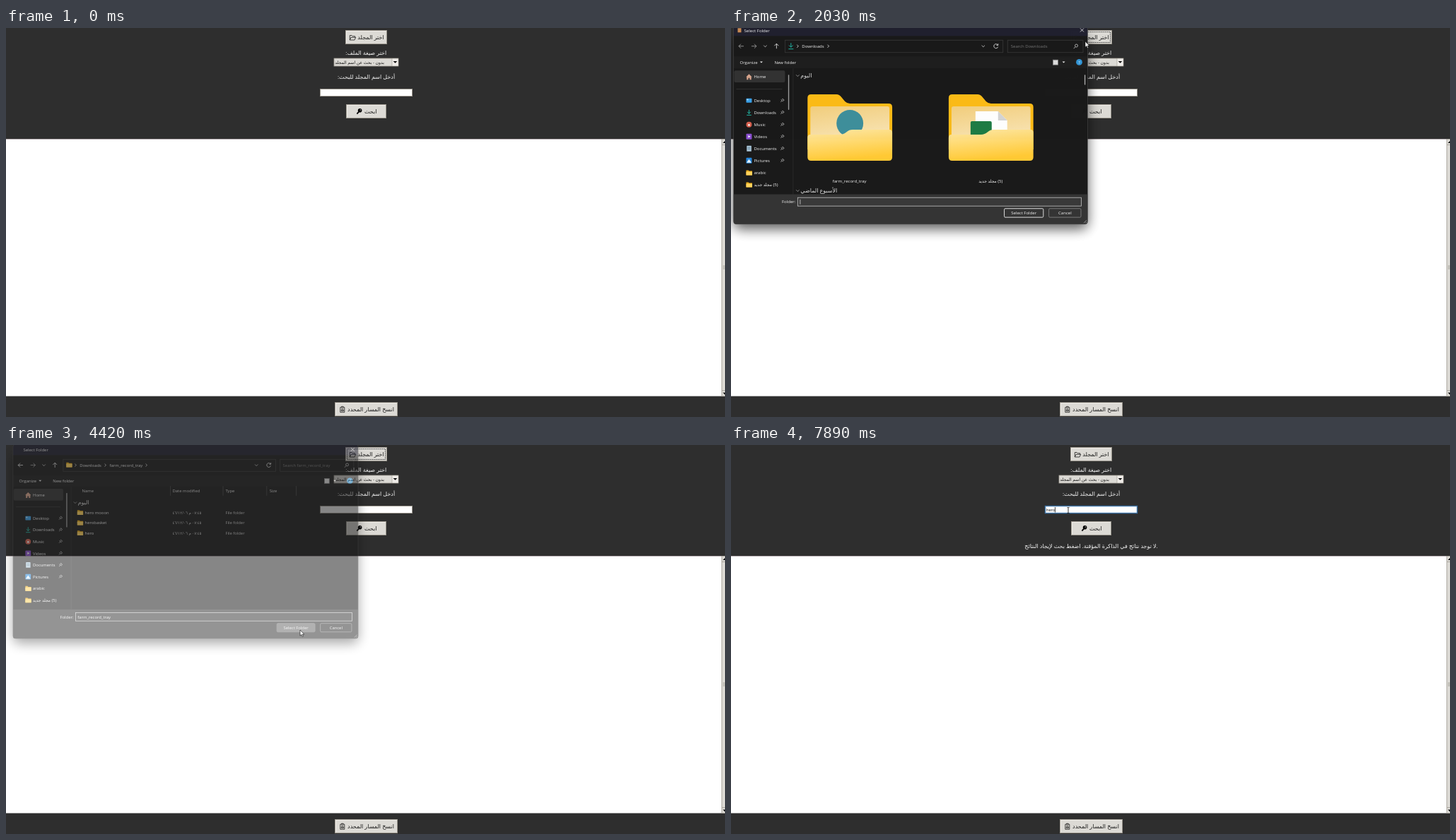
Animation, 1017 px wide and 551 px high, one loop 8 s. Source, as an HTML page:

```html
<!DOCTYPE html>
<html lang="ar">
<head>
<meta charset="utf-8">
<title>Folder search</title>
<style>
html, body { margin: 0; width: 100%; height: 100%; overflow: hidden; background: #2e2e2e; }
svg { display: block; width: 1017px; height: 551px; font-family: 'Open Sans', 'DejaVu Sans', sans-serif; }
</style>
</head>
<body>
<svg id="stage" viewBox="0 0 1017 551" xmlns="http://www.w3.org/2000/svg"></svg>
<script>
const LOOP = 8000;
const NAME = 'farm_record_tray';
const NEW_DIR = 'مجلد جديد\u200e (5)';
const WHITE = '#f4f4f4';

// Markup helpers
const rect = (x, y, w, h, fill, more = '') =>
  `<rect x="${x}" y="${y}" width="${w}" height="${h}" fill="${fill}" ${more}/>`;
const line = (d, color = WHITE, w = .8, more = '') =>
  `<path d="${d}" fill="none" stroke="${color}" stroke-width="${w}" ${more}/>`;
const shape = (d, fill, more = '') => `<path d="${d}" fill="${fill}" ${more}/>`;
const disc = (x, y, r, fill) => `<circle cx="${x}" cy="${y}" r="${r}" fill="${fill}"/>`;
const text = (x, y, s, size = 6.05, fill = WHITE, more = '') =>
  `<text x="${x}" y="${y}" font-size="${size}" fill="${fill}" ${more}>${s}</text>`;
const mid = 'text-anchor="middle"';
const rtl = mid + ' direction="rtl"';
const group = (id, body, more = '') => `<g id="${id}" ${more}>${body}</g>`;
const right = (x, y) => line(`M${x - 1} ${y - 2}l2 2-2 2`);
const down = (x, y, c = WHITE) => line(`M${x - 2.2} ${y - 1.1}l2.2 2.2 2.2-2.2`, c, .7);
const caretDown = (x, y, c = WHITE, r = 2) => shape(`M${x - r} ${y - r / 2}h${2 * r}l${-r} ${r}z`, c);
const smallFolder = (x, y) =>
  shape(`M${x} ${y}h3.2l1 1.1h4.3v6h-8.5z`, '#e8a917') + rect(x, y + 2.1, 8.5, 5, '#ffd35c', 'rx=".6"');

// Main window
function button(id, x, y, w, h) {
  return `<rect id="${id}" x="${x + .5}" y="${y + .5}" width="${w - 1}" height="${h - 1}" fill="#dcdad5" stroke="#9e9a91"/>` +
    line(`M${x + 1.5} ${y + h - 1.5}V${y + 1.5}H${x + w - 1.5}`, '#eeebe7', 1);
}

function app() {
  const ink = '#1a1a1a';
  return rect(0, 0, 1017, 551, '#2e2e2e') +
    button('pick', 480, 3, 59, 20) +
    line('M486.3 17V10.5h2.8l1 1.2h3.5v1.6M486.3 17l1.8-3.7h6.6l-1.7 3.7z', ink, .8) +
    text(516, 16.3, 'اختر المجلد', 8, ink, rtl) +
    group('ring', line('M482.5 5.5h54v15h-54z', '#222', .8, 'stroke-dasharray="1 .6"')) +
    text(509.3, 38.3, 'اختر صيغة الملف:', 8, WHITE, rtl) +
    rect(464, 43, 91, 11, '#dcdad5', 'stroke="#9e9a91" stroke-width=".8"') +
    rect(546, 43.6, 8.6, 9.8, '#eeebe7') + line('M546 43v11', '#9e9a91', .6) +
    caretDown(550.5, 48.3, '#000', 2.8) +
    text(465.3, 50.7, 'بدون - بحث عن اسم المجلد', 6.15, '#111') +
    text(509.5, 72, 'أدخل اسم المجلد للبحث:', 8, WHITE, rtl) +
    '<rect id="field" x="444.5" y="86.5" width="130" height="10" fill="#fff"/>' +
    text(446, 93.8, '', 5.6, '#111', 'id="typed"') +
    '<path id="caret" fill="none" stroke="#111" stroke-width=".8"/>' +
    button('find', 481, 108, 57, 20) +
    disc(500.6, 116.8, 2.8, '#000') + line('M499 118.6l-2.6 3', '#000', 1.7) + disc(501.3, 116, .9, '#777') +
    text(515.7, 121.2, 'ابحث', 8, ink, rtl) +
    group('current',
      line('M393.4 146.8v-7.2h3l1 1.4h4.3v5.8zM393.4 142h3.2l1-1', WHITE, .8) +
      text(449.8, 146, 'المجلد الحالي', 7.9, WHITE, 'text-anchor="end"') +
      text(449.8, 146, ': C:/Users/nemud/Downloads/' + NAME, 7.9)) +
    group('empty', text(509.5, 146, 'لا توجد نتائج في الذاكرة المؤقتة. اضغط بحث لإيجاد النتائج.', 8, WHITE, mid)) +
    rect(0, 157, 1017, 364.5, '#fff') + rect(0, 157, 1013, 1, '#b9b0b3') +
    rect(1012.5, 157.5, 5, 364, '#dcdad5', 'stroke="#9e9a91" stroke-width=".8"') +
    line('M1013 165.5h4M1013 513.5h4M1014 337h3M1014 339h3M1014 341h3', '#9e9a91', .8) +
    shape('M1014 163l3-3v3z', '#000') + shape('M1014 516.5h3v3z', '#000') +
    button('copy', 465, 530, 89, 20) +
    line('M472.8 537.3h6v7h-6zM474.4 537.2v-1h2.8v1M474.2 539.5h3.2M474.2 542.5h3.2v-1.4h-3.2z', ink, .8) +
    text(516, 543.2, 'انسخ المسار المحدد', 8, ink, rtl);
}

// Folder dialog
function bigFolder(x, inside) {
  return `<g transform="translate(${x} 94)">` +
    shape('M0 5q0-5 5-5h36q4 0 7 4l5 6q3 3 7 3h55q5 0 5 5v60H0z', '#fcbc16') +
    rect(4, 17, 112, 60, 'url(#paper)', 'rx="3"') + inside +
    shape('M0 61q0-4 4-4h42q5 0 9-3.500t9-3.500h52q4 0 4 4v35q0 5-5 5H5q-5 0-5-5z', 'url(#front)') + '</g>';
}

function sidebar() {
  const icons = [
    (x, y) => rect(x, y - 3, 8, 6, '#3aa0e8', 'rx=".8"') + rect(x + 1, y - 2, 2, 1.6, '#bfe4ff'),
    (x, y) => line(`M${x + 4} ${y - 4}v5.500m-2.500-2.500l2.500 2.500 2.500-2.500M${x + .8} ${y + 3.6}h6.500`, '#21b5a5', 1),
    (x, y) => disc(x + 4, y, 4, '#d7604f') + disc(x + 4, y + .6, 1.3, '#fff'),
    (x, y) => rect(x, y - 4, 8, 8, '#8a4fd0', 'rx="1"') + shape(`M${x + 3} ${y - 1.8}l3 1.8-3 1.8z`, '#fff'),
    (x, y) => rect(x + .8, y - 4, 6.6, 8, '#a9c4d6', 'rx=".6"') + line(`M${x + 2} ${y - 1.500}h4m-4 2h4`, '#4e7286', .7),
    (x, y) => rect(x, y - 4, 8, 8, '#2585d8', 'rx=".8"') + shape(`M${x + .5} ${y + 3}l3.500-5 3.500 5z`, '#e6f5ff'),
    (x, y) => smallFolder(x, y - 3.4),
    (x, y) => smallFolder(x, y - 3.4)
  ];
  const names = ['Desktop', 'Downloads', 'Music', 'Videos', 'Documents', 'Pictures', 'arabic', NEW_DIR];
  const pin = y => line(`M70 ${y + 2}l1.600-1.600m-1-1.600l2.600 2.600m-1.500-2.500l1-1.500 2 2-1.500 1`, '#b5b5b5', .9);
  return rect(4, 60, 72, 17, '#333', 'rx="2"') +
    shape('M21 69l4-4 4 4-.8.6v3.600h-2.200v-2.500h-2v2.500h-2.200v-3.600z', '#d9a58c') + text(32, 71.2, 'Home') +
    rect(80.5, 66, 1.4, 50, '#9c9c9c', 'rx=".7"') + rect(7, 86, 65, .8, '#383838') +
    names.map((n, i) => {
      const y = 102.7 + 17.05 * i;
      return icons[i](21, y) + text(32, y + 2.2, n) + (i < 6 ? pin(y) : '');
    }).join('');
}

function iconView() {
  const page = shape('M38 51V24h32l13 13v14z', '#fff') + shape('M70 24v13h13z', '#d5d5d5') + rect(31, 38, 30, 21, '#1d7c45', 'rx="2"');
  return group('headHot', rect(88, 60, 408, 15, '#4d4d4d')) +
    down(94, 67.3, '#bbb') + text(98, 70, 'اليوم', 8, '#ddd') +
    group('itemHot', rect(95.5, 75.5, 144, 146.5, '#333')) +
    group('itemOn', rect(95.5, 75.5, 144, 146.5, '#4f4f4f', 'stroke="#8e8e8e" stroke-width=".8"')) +
    bigFolder(108, disc(60, 41, 19, '#3f8f9b')) + bigFolder(308, page) +
    text(167.5, 218.8, NAME, 6.05, WHITE, mid) + text(367.5, 218.8, NEW_DIR, 6.05, WHITE, mid) +
    rect(500.4, 66, 1.4, 14.5, '#a8a8a8', 'rx=".7"') +
    down(94, 230.6, '#bbb') + text(98, 233.5, 'الأسبوع الماضي', 8, '#ddd');
}

function listView() {
  const heads = [[103.5, 'Name'], [235, 'Date modified'], [312, 'Type'], [376, 'Size']];
  return heads.map(([x, s]) => text(x, 64.9, s, 6.05, '#ddd')).join('') +
    line('M232 56v14M308.5 56v14M372 56v14M415 56v14', '#4a4a4a', .8) +
    down(93.5, 80, '#bbb') + text(97.5, 82.7, 'اليوم', 8, '#ddd') +
    ['hero mooon', 'herobasket', 'hero'].map((n, i) => {
      const y = 94.7 + 14.9 * i;
      return smallFolder(96.5, y - 3.8) + text(107.6, y + 2.2, n) +
        text(235, y + 2.2, '٠٧:٤٥ م ٤٦/١٢/٠٦', 5.6, '#ccc') + text(312, y + 2.2, 'File folder', 6.05, '#ccc');
    }).join('');
}

function dialog() {
  const dim = '#777';
  const arrow = (x, d, c) => line(`M${x - 3.5 * d} 25.500h${7 * d}m${-3 * d}-3l${3 * d} 3 ${-3 * d} 3`, c);
  return rect(3, 11, 502, 274, '#000', 'rx="8" opacity=".65" filter="url(#soft)"') +
    '<g clip-path="url(#frame)">' +
    rect(3, -5, 502, 284, '#191919') + rect(3, -5, 502, 16, '#20202f') +
    rect(3, 40, 502, 17, '#1e1e1e') +
    group('logo', rect(9, 0, 5, 6, '#c98a54')) +
    text(18, 5.3, 'Select Folder', 6.1) + line('M494.5.2l5 5m0-5l-5 5', WHITE, .8) +
    group('backOff', arrow(14, -1, '#aaa')) + group('backOn', arrow(14, -1, '#fff')) +
    arrow(32, 1, '#aaa') + down(48, 25.5) + line('M64 29v-7m-3 3l3-3 3 3') +
    rect(76, 17, 309, 17.5, '#191919', 'stroke="#3a3a3a" stroke-width=".8"') +
    rect(391.5, 17, 107, 17.5, '#191919', 'stroke="#3a3a3a" stroke-width=".8"') +
    right(94, 25.5) + text(100, 27.7, 'Downloads') +
    down(357, 25.5) + line('M377.4 23.600a3 3 0 1 0 .5 2.800M378 22v2.200h-2.200', WHITE, .8) +
    `<circle cx="489" cy="24.8" r="2" fill="none" stroke="#ccc" stroke-width=".8"/>` + line('M487.5 26.4l-2.300 2.500', '#ccc') +
    group('pathA', line('M84.500 21v6m-2.800-2.700l2.800 2.800 2.800-2.800M81 29.500h7', '#21b5a5', 1) + text(396, 27.7, 'Search Downloads', 6.05, dim)) +
    group('pathMore', right(137.3, 25.5)) +
    group('pathB', smallFolder(80.5, 21.5) + text(143.5, 27.7, NAME) + right(197, 25.5) +
      text(395.5, 27.7, 'Search ' + NAME, 6.05, dim)) +
    text(12, 50.4, 'Organize') + caretDown(42.5, 48.4) + text(61, 50.4, 'New folder') +
    rect(456, 45, 7, 7, '#ddd', 'stroke="#888" stroke-width=".8"') + caretDown(471, 48.4) +
    disc(493, 48.3, 4.4, '#3195d6') + text(493, 50.5, '?', 6, '#fff', mid) +
    rect(87.2, 57, .7, 179, '#303030') +
    group('busy', text(297, 70.500, 'Working on it...', 6.05, WHITE, mid)) +
    group('side', sidebar()) + group('icons', iconView()) + group('list', listView()) +
    rect(3, 235.7, 502, 43, '#333') +
    text(91, 248.7, 'Folder:', 6.05, WHITE, 'text-anchor="end"') +
    rect(94, 240.4, 402, 12, '#383838', 'stroke="#c4c4c4" stroke-width=".8"') +
    group('nameCaret', line('M97.500 243v7', WHITE, .7)) +
    group('nameIn', text(97, 248.6, NAME)) +
    '<rect id="okBtn" x="386.8" y="256" width="55.4" height="12.4" rx="1.5" stroke-width=".9"/>' +
    text(414.5, 264.3, 'Select Folder', 6.05, WHITE, mid) +
    rect(450, 256, 45.500, 12.4, '#333', 'rx="1.5" stroke="#8a8a8a" stroke-width=".8"') +
    text(472.8, 264.3, 'Cancel', 6.05, WHITE, mid) +
    line('M499.500 276.500l4-4m-1.500 4l1.500-1.500', '#aaa', .8) + '</g>' +
    rect(3, -5, 502, 283, 'none', 'rx="4" stroke="#4a4a4a" stroke-width=".6"');
}

const stops = (id, a, b) => `<linearGradient id="${id}" x2=".25" y2="1"><stop stop-color="${a}"/><stop offset="1" stop-color="${b}"/></linearGradient>`;
const stage = document.getElementById('stage');
stage.innerHTML = '<defs>' + stops('paper', '#f3cf7d', '#fbe9bd') + stops('front', '#ffe9a6', '#ffc933') +
  '<filter id="soft" x="-10%" y="-20%" width="120%" height="140%"><feGaussianBlur stdDeviation="9"/></filter>' +
  '<clipPath id="frame"><rect x="3" y="-5" width="502" height="283" rx="4"/></clipPath></defs>' +
  app() + group('dialog', dialog()) +
  group('cursor', group('tap', disc(0, 1, 6, '#f5e400'), 'opacity=".85"') +
    group('arrow', shape('M0 0V8.200L1.900 6.500 3.200 9.400 4.500 8.800 3.200 6.100H5.700Z', '#fff', 'stroke="#111" stroke-width=".6"')) +
    group('beam', line('M-1.500-3.500h1l.5.5.5-.5h1M0-3v7M-1.500 4.500h1l.5-.5.5.5h1', '#000', .8)));

const el = {};
stage.querySelectorAll('[id]').forEach(e => el[e.id] = e);
const show = (id, on) => el[id].setAttribute('display', on ? 'inline' : 'none');
const set = (id, attrs) => { for (const k in attrs) el[id].setAttribute(k, attrs[k]); };

// Pointer stops: time, x, y
const PATH = [
  [120, 979, 544], [890, 504, 22], [1090, 504, 22], [1290, 501, 19], [2370, 501, 19],
  [2640, 441, 75], [3060, 208, 172], [3530, 208, 172], [3940, 415, 257], [4080, 416, 262],
  [4490, 416, 262], [4760, 462, 117], [4960, 477, 92], [LOOP, 477, 92]
];
const TAPS = [[1430, 1500], [3060, 3130], [3390, 3530], [4220, 4300], [5030, 5100]];
const BLINKS = [[5780, 6100], [6700, 6970], [7630, 7890]];
const KEYS = [6170, 6900, 7040, 7230];
const within = (t, list) => list.some(([a, b]) => t >= a && t < b);
const clamp = v => Math.max(0, Math.min(1, v));

function pointer(t) {
  const i = Math.max(1, PATH.findIndex(p => p[0] > t));
  const [t0, x0, y0] = PATH[i - 1], [t1, x1, y1] = PATH[i];
  let k = clamp((t - t0) / (t1 - t0));
  if (i === 1) k = k * k * (3 - 2 * k);
  return [x0 + (x1 - x0) * k, y0 + (y1 - y0) * k];
}

function draw(t) {
  // pointer
  const [px, py] = pointer(t);
  const beam = t >= 4890;
  show('cursor', t >= 120);
  set('cursor', { transform: `translate(${px.toFixed(2)} ${py.toFixed(2)})` });
  show('arrow', !beam);
  show('beam', beam);
  show('tap', within(t, TAPS));

  // main window
  const focus = t >= 5060;
  set('pick', { fill: t >= 830 && t < 1830 ? '#eeebe7' : '#dcdad5' });
  show('ring', t >= 1430 && !focus);
  set('field', { stroke: focus ? '#3f75a8' : '#9e9a91', 'stroke-width': focus ? 1.4 : 1 });
  const typed = KEYS.filter(k => t >= k).length;
  el.typed.textContent = 'hero'.slice(0, typed);
  const cx = 446 + (typed ? el.typed.getComputedTextLength() + .3 : 0);
  set('caret', { d: `M${cx} 88v7.500` });
  show('caret', focus && !within(t, BLINKS));
  show('current', t >= 4560 && t < 6300);
  show('empty', t >= 6300);

  // dialog
  const open = t >= 1830 && t < 4490;
  show('dialog', open);
  if (!open) return;
  const closing = t >= 4350;
  const out = clamp((t - 4350) / 140);
  const rest = Math.pow(1 - clamp((t - 1830) / 300), 3);
  const s = closing ? 1 - .054 * out : 1 - .056 * rest;
  set('dialog', {
    opacity: closing ? 1 - .94 * out : 1 - .21 * rest,
    transform: `translate(254 136.5) scale(${s}) translate(-254 -136.5)`
  });
  const loaded = t >= 1970, inside = t >= 3530, picked = t >= 3100;
  show('logo', !closing);
  show('busy', !loaded);
  show('side', loaded);
  show('icons', loaded && !inside);
  show('list', inside);
  show('pathA', !inside);
  show('pathB', inside);
  show('pathMore', loaded);
  show('backOn', inside);
  show('backOff', !inside);
  show('headHot', t >= 2560 && t < 2680);
  show('itemHot', t >= 2980 && !picked);
  show('itemOn', picked);
  show('nameIn', picked);
  show('nameCaret', t < 2170);
  const hot = t >= 3900, pressed = t >= 4220;
  set('okBtn', { fill: pressed ? '#6a6a6a' : hot ? '#454545' : '#333', stroke: pressed ? '#777' : '#f0f0f0' });
}

function tick() {
  draw(performance.now() % LOOP);
  requestAnimationFrame(tick);
}
tick();
</script>
</body>
</html>
```
